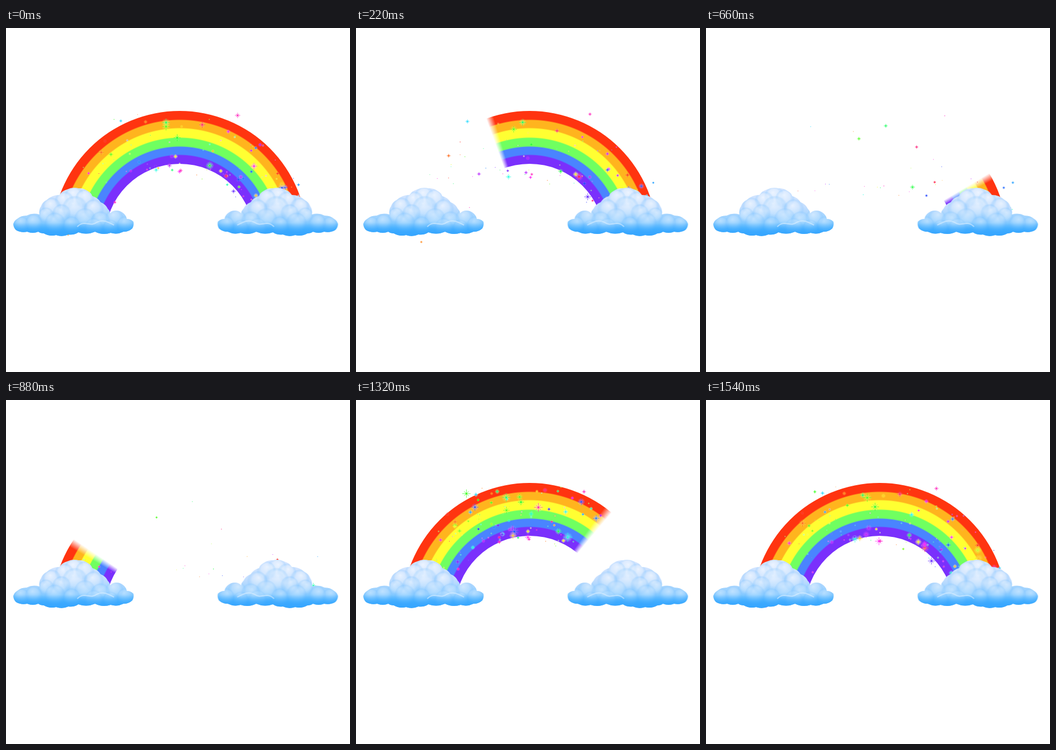
Animation, 618 px wide and 618 px high, one loop 1.65 s. Source, as an HTML page with a canvas:

```html
<!DOCTYPE html>
<html lang="en">
<head>
<meta charset="utf-8">
<title>Rainbow</title>
<style>
html, body { margin: 0; width: 100%; height: 100%; overflow: hidden; background: #fff; }
canvas { display: block; width: 618px; height: 618px; }
</style>
</head>
<body>
<canvas id="stage" width="618" height="618"></canvas>
<script>
const SIZE = 618, STEP = 110, STEPS = 15;
const CX = 312, CY = 378, OUTER = 229, INNER = 134;
const TAU = Math.PI * 2, RAD = Math.PI / 180;
const ctx = document.getElementById('stage').getContext('2d');

function makeLayer(w = SIZE, h = SIZE) {
  const canvas = document.createElement('canvas');
  canvas.width = w;
  canvas.height = h;
  return canvas.getContext('2d');
}

function seeded(seed) {
  return () => {
    seed = seed + 0x6D2B79F5 | 0;
    let t = Math.imul(seed ^ seed >>> 15, 1 | seed);
    t = t + Math.imul(t ^ t >>> 7, 61 | t) ^ t;
    return ((t ^ t >>> 14) >>> 0) / 4294967296;
  };
}

function disc(c, x, y, r, fill) {
  c.fillStyle = fill;
  c.beginPath();
  c.arc(x, y, r, 0, TAU);
  c.fill();
}

// Rainbow

const BANDS = [
  ['#7a30fc', 134, 150], ['#4a84ff', 150, 165], ['#70ff60', 165, 181],
  ['#ffff32', 181, 198], ['#ffb41e', 198, 213], ['#ff3410', 213, 229]
];
const bow = makeLayer();

function bandFill() {
  const fill = bow.createRadialGradient(CX, CY, INNER, CX, CY, OUTER);
  const at = r => Math.min(1, Math.max(0, (r - INNER) / (OUTER - INNER)));
  for (const [color, from, to] of BANDS) {
    fill.addColorStop(at(from === INNER ? from : from + 1), color);
    fill.addColorStop(at(to === OUTER ? to : to - 1), color);
  }
  return fill;
}
const rainbowFill = bandFill();

// Angles are in degrees, clockwise from straight up.
const growEdge = step => -56 + 24 * (step - 8);
const wipeEdge = step => -20 + 19.8 * (step - 2);

function drawRainbow(step) {
  bow.globalCompositeOperation = 'source-over';
  bow.clearRect(0, 0, SIZE, SIZE);
  bow.fillStyle = rainbowFill;
  bow.beginPath();
  bow.arc(CX, CY, OUTER, Math.PI, 0);
  bow.arc(CX, CY, INNER, 0, Math.PI, true);
  bow.fill();

  if (step > 0 && step < 14) {
    const growing = step > 6;
    const edge = growing ? growEdge(step) : wipeEdge(step);
    const soft = growing ? -4 : 3.5;
    const mask = bow.createConicGradient(Math.PI / 2, CX, CY);
    const turn = a => (a + 180) / 360;
    const stops = [[turn(edge), 'rgba(0,0,0,0)'], [turn(edge + soft), '#000']];
    if (growing) stops.reverse();
    stops.forEach(stop => mask.addColorStop(...stop));
    bow.globalCompositeOperation = 'destination-in';
    bow.fillStyle = mask;
    bow.fillRect(0, 0, SIZE, SIZE);
  }
  ctx.drawImage(bow.canvas, 0, 0, SIZE, 334, 0, 0, SIZE, 334);
}

// Clouds

const OUTLINE = [
  [13, 352], [20, 343], [37, 337], [60, 335], [63, 320], [73, 309], [96, 300],
  [110, 290], [130, 288], [147, 293], [155, 302], [170, 313], [183, 325],
  [187, 333], [197, 328], [210, 332], [217, 343], [229, 348], [227, 360],
  [211, 366], [188, 368], [160, 366], [130, 367], [112, 371], [90, 372],
  [68, 369], [58, 366], [38, 366], [18, 363]
];
const PUFFS = [
  [123, 303, 19], [105, 311, 18], [142, 307, 18], [82, 322, 18], [124, 325, 24],
  [158, 326, 19], [100, 333, 17], [72, 337, 15], [195, 342, 17], [142, 343, 20],
  [170, 347, 18], [28, 352, 14], [50, 350, 16], [88, 350, 19], [118, 354, 16],
  [214, 353, 15], [158, 358, 17], [188, 358, 14]
];

function makeCloud() {
  const c = makeLayer(245, 385);
  c.beginPath();
  c.moveTo(...OUTLINE[0]);
  OUTLINE.forEach(([x, y], i) => {
    const [nx, ny] = OUTLINE[(i + 1) % OUTLINE.length];
    c.quadraticCurveTo((x + nx) / 2 + (ny - y) * .2, (y + ny) / 2 - (nx - x) * .2, nx, ny);
  });
  c.clip();

  const sky = c.createLinearGradient(0, 286, 0, 374);
  sky.addColorStop(0, '#dce9ff');
  sky.addColorStop(.4, '#c4defe');
  sky.addColorStop(.68, '#95d0ff');
  sky.addColorStop(.86, '#50b6ff');
  sky.addColorStop(1, '#36a4ff');
  c.fillStyle = sky;
  c.fillRect(0, 280, 245, 105);

  for (const [x, y, r] of PUFFS) {
    const light = Math.min(.75, (385 - y) / 85);
    const puff = c.createRadialGradient(x - r * .15, y - r * .4, 0, x, y, r);
    puff.addColorStop(0, `rgba(245,249,255,${light})`);
    puff.addColorStop(.55, `rgba(228,241,255,${light * .55})`);
    puff.addColorStop(.85, 'rgba(130,196,255,.22)');
    puff.addColorStop(1, 'rgba(110,184,255,0)');
    disc(c, x, y, r, puff);
  }

  const shade = c.createLinearGradient(0, 350, 0, 373);
  shade.addColorStop(0, 'rgba(54,166,255,0)');
  shade.addColorStop(.75, 'rgba(54,166,255,.8)');
  shade.addColorStop(1, 'rgba(54,166,255,.9)');
  c.fillStyle = shade;
  c.fillRect(0, 350, 245, 30);

  // Pale ridge along the low right lobe
  c.strokeStyle = 'rgba(222,241,255,.6)';
  c.lineWidth = 2;
  c.beginPath();
  c.moveTo(128, 357);
  c.bezierCurveTo(142, 343, 151, 359, 163, 349);
  c.bezierCurveTo(176, 342, 187, 351, 194, 354);
  c.stroke();
  return c.canvas;
}
const cloud = makeCloud();

function drawClouds() {
  ctx.drawImage(cloud, 0, 0);
  ctx.save();
  ctx.translate(609.5, 0);
  ctx.scale(-1, 1);
  ctx.drawImage(cloud, 0, 0);
  ctx.restore();
}

// Sparkles are shed by the growing end of the rainbow, then drift and sink.

const rand = seeded(417);
const between = (a, b) => a + (b - a) * rand();

const sparks = Array.from({ length: 215 }, () => {
  const birth = between(7.2, 14.8);
  const angle = (Math.min(74, growEdge(birth)) - between(0, 12)) * RAD;
  const radius = between(126, 234);
  return {
    birth,
    x: CX + radius * Math.sin(angle),
    y: CY - radius * Math.cos(angle),
    vx: between(-4, 6),
    vy: between(-4, 3),
    life: 2 + 12 * rand() ** 2,
    size: 1 + 8 * rand() ** 1.8,
    hue: between(0, 360),
    phase: between(0, TAU)
  };
});

function ray(x, y, dx, dy) {
  ctx.moveTo(x - dx, y - dy);
  ctx.lineTo(x + dx, y + dy);
}

function drawSpark(spark, step) {
  const age = (step - spark.birth + STEPS) % STEPS;
  if (age > spark.life) return;
  const x = spark.x + spark.vx * age;
  const y = spark.y + spark.vy * age + .3 * age * age;
  const fade = Math.min(1, 1.6 * (1 - age / spark.life) + .2);
  const s = spark.size * fade * (.8 + .2 * Math.sin(spark.phase + step * 2));

  // Screen blending lets the glow show on the bands only.
  ctx.globalCompositeOperation = 'screen';
  const glow = ctx.createRadialGradient(x, y, 0, x, y, s + 1);
  glow.addColorStop(0, `hsla(${spark.hue},100%,85%,.85)`);
  glow.addColorStop(.4, `hsla(${spark.hue},100%,65%,.45)`);
  glow.addColorStop(1, `hsla(${spark.hue},100%,55%,0)`);
  disc(ctx, x, y, s + 1, glow);

  ctx.globalCompositeOperation = 'source-over';
  const color = `hsla(${spark.hue},100%,56%,.8)`;
  disc(ctx, x, y, Math.min(1.6, .5 + s * .15), color);
  if (s < 2) return;
  ctx.strokeStyle = color;
  ctx.lineWidth = .9;
  ctx.beginPath();
  ray(x, y, s, 0);
  ray(x, y, 0, s);
  ray(x, y, s * .55, s * .55);
  ray(x, y, s * .55, -s * .55);
  ctx.stroke();
}

function draw(step) {
  ctx.fillStyle = '#fff';
  ctx.fillRect(0, 0, SIZE, SIZE);
  drawRainbow(step);
  sparks.forEach(spark => drawSpark(spark, step));
  drawClouds();
}

let shown = -1;
function tick() {
  const step = Math.floor(performance.now() / STEP) % STEPS;
  if (step !== shown) draw(shown = step);
  requestAnimationFrame(tick);
}
tick();
</script>
</body>
</html>
```
